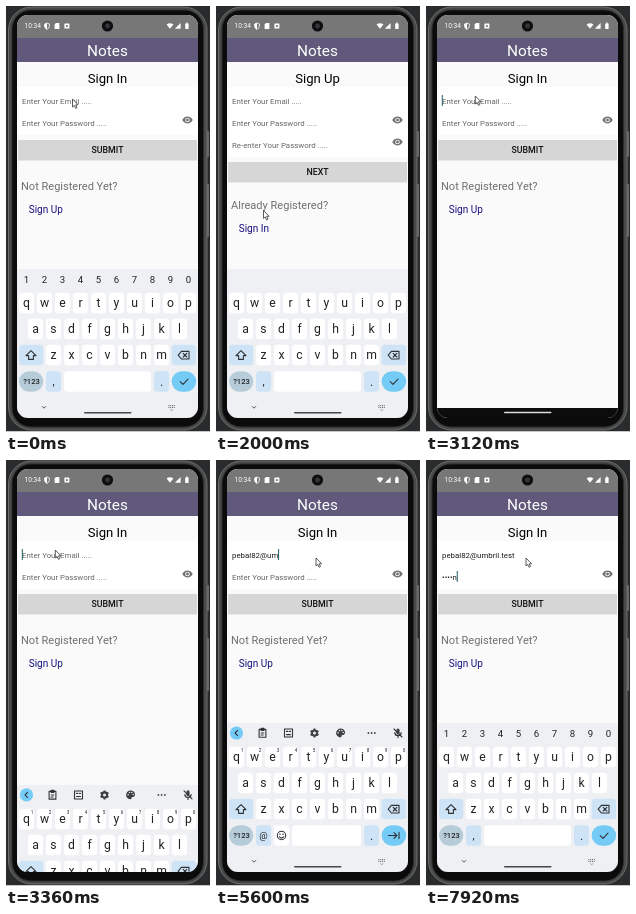
Animation of 204 by 426 pixels, one loop 8000 ms. Source, as an HTML page:

```html
<!DOCTYPE html>
<html lang="en">
<head>
<meta charset="utf-8">
<title>Notes sign in</title>
<style>
  html, body { margin: 0; width: 100%; height: 100%; overflow: hidden; background: #2a2b2c; }
  svg { display: block; width: 204px; height: 426px; font-family: Roboto, sans-serif; }
  text { white-space: pre; }
  .line { fill: none; stroke: #303336; stroke-width: 1.1; stroke-linecap: round; stroke-linejoin: round; }
</style>
</head>
<body>
<svg id="stage" viewBox="0 0 204 426" xmlns="http://www.w3.org/2000/svg"></svg>
<script>
const LOOP = 8000;
const HINT = '#666', INK = '#202124', KEY = '#fff', BLUE = '#cfe3f6', SKY = '#74cbf6';

const rect = (x, y, w, h, fill, r = 0, more = '') =>
  `<rect x="${x}" y="${y}" width="${w}" height="${h}" rx="${r}" fill="${fill}" ${more}/>`;
const text = (x, y, size, fill, str, more = '') =>
  `<text x="${x}" y="${y}" font-size="${size}" fill="${fill}" ${more}>${str}</text>`;
const mid = (x, y, size, fill, str, more = '') =>
  text(x, y, size, fill, str, 'text-anchor="middle" ' + more);
const circle = (x, y, r, fill) => `<circle cx="${x}" cy="${y}" r="${r}" fill="${fill}"/>`;
const path = (d, more = 'class="line"') => `<path d="${d}" ${more}/>`;
const at = (x, y, body) => `<g transform="translate(${x} ${y})">${body}</g>`;
const group = (id, body) => `<g id="${id}">${body}</g>`;

const eye = y => at(181.5, y,
  path('M-5.2 0C-3-4.6 3-4.6 5.2 0C3 4.6-3 4.6-5.2 0Z', 'fill="#707070"') +
  circle(0, 0, 2.3, '#fff') + circle(0, 0, 1.4, '#707070'));

function form(title, button, y, question, questionY, link) {
  return mid(101.5, 77, 13.1, '#000', title) +
    rect(12, y, 179, 20.5, '#d6d6d6') +
    mid(101.5, y + 13.3, 8.8, '#111', button, 'font-weight="500"') +
    text(15, questionY, 11.04, '#707070', question) +
    text(22.7, questionY + 23, 10, '#15107c', link);
}

function key(x, y, w, label, fill = KEY) {
  return rect(x - w / 2, y - 10.3, w, 20.6, fill, 3.5) + mid(x, y + 4, 12.2, INK, label);
}

function row(letters, x, y) {
  return [...letters].map((c, i) => key(x + i * 18, y, 15.2, c)).join('');
}

function digits(x, y, size) {
  return [...'1234567890'].map((c, i) => mid(x + i * 18, y, size, INK, c)).join('');
}

function toolbar() {
  return circle(20.5, 273, 6.6, SKY) + path('M21.6 270.4L19 273L21.6 275.6') +
    at(46.5, 273, path('M-3.4-3.6H3.4V4.2H-3.4ZM-1.4-4.6H1.4V-2.6H-1.4ZM-1.4 0H1.4M-1.4 2H.6')) +
    at(72.5, 273, path('M-4-4H4V4H-4ZM-2-1.6H-.6M1-1.6H2M-2 1.6H2')) +
    at(98.5, 273, circle(0, 0, 3.6, '#3c4043') +
      path('M0-4.5V4.5M-3.9-2.2L3.9 2.2M-3.9 2.2L3.9-2.2', 'stroke="#3c4043" stroke-width="2"') +
      circle(0, 0, 1.5, '#eff0f3')) +
    at(124.5, 273, path('M0-4.4A4.4 4.4 0 1 0 0 4.4C1.5 4.4.4 2.6 1.6 2H3C6 1 4.6-4.4 0-4.4Z', 'fill="#3c4043"') +
      [[-2.4, -.2], [-1, -2.4], [1.4, -2.4], [2.7, -.4]].map(p => circle(...p, .75, '#eff0f3')).join('')) +
    [152.4, 155.6, 158.8].map(x => circle(x, 273, .9, '#3c4043')).join('') +
    at(182, 273, rect(-1.6, -4.6, 3.2, 6, '#3c4043', 1.6) +
      path('M-3.2-.4C-3 3.6 3 3.6 3.2-.4M0 2.8V4.6M-4-4L4 4'));
}

function keyboard() {
  const smile = at(65.5, 375.5, path('M-4.2 0A4.2 4.2 0 1 1 4.2 0A4.2 4.2 0 1 1-4.2 0M-2 1.2C-1.2 2.8 1.2 2.8 2 1.2') +
    circle(-1.5, -1.2, .7, INK) + circle(1.5, -1.2, .7, INK));
  return rect(11, 263, 181, 151, '#eff0f3') +
    row('qwertyuiop', 20.5, 297) + row('asdfghjkl', 29.5, 323) + row('zxcvbnm', 47.5, 349) +
    rect(13, 338.7, 24.3, 20.6, BLUE, 3.5) +
    path('M25 344.6L30 349.6H27.4V353.4H22.6V349.6H20Z') +
    rect(165.6, 338.7, 24.6, 20.6, BLUE, 3.5) +
    path('M175.4 345.4H183V353H175.4L172.2 349.2ZM177.2 347.4L180.8 351M180.8 347.4L177.2 351') +
    rect(13, 365.2, 24.3, 20.6, '#b6cdd9', 10.3) + mid(25.5, 378.2, 7.6, INK, '?123', 'font-weight="500"') +
    rect(40, 365.2, 15.2, 20.6, BLUE, 3.5) +
    key(155.5, 375.5, 15.2, '.', BLUE) +
    rect(165.6, 365.2, 24.6, 20.6, SKY, 10.3) +
    group('digitRow', digits(20.5, 277, 9.6)) +
    group('passKeys', mid(47.5, 379, 11, INK, ',') + rect(58, 365.2, 87, 20.6, KEY, 3.5) +
      path('M174.2 375.7L177 378.4L182 373.2')) +
    group('mailKeys', digits(26, 292, 4.6) + mid(47.5, 378.8, 9.4, INK, '@') +
      rect(58, 365.2, 15.2, 20.6, KEY, 3.5) + smile + rect(76, 365.2, 69, 20.6, KEY, 3.5) +
      path('M172.4 375.5H180.6M178 372.6L180.8 375.5L178 378.4M183 372.4V378.6')) +
    group('tools', toolbar()) +
    path('M36 400.2L38 402.2L40 400.2', 'fill="none" stroke="#444" stroke-width=".9"') +
    path('M162.4 399.6H169M162.4 401.4H169', 'stroke="#555" stroke-width=".9" stroke-dasharray="1 .8"') +
    path('M164.2 403.4L165.7 404.6L167.2 403.4', 'fill="none" stroke="#777" stroke-width=".7"') +
    rect(78, 406.1, 47.5, 1.4, '#45474a', .7);
}

function statusBar() {
  return rect(11, 9, 181, 23, '#777') + text(18.6, 22.4, 6.6, '#fff', '10:34') +
    path('M38.6 18L41 17L43.4 18V20.4Q43 22.4 41 23.4Q39 22.4 38.6 20.4Z',
      'fill="none" stroke="#fff" stroke-width=".8"') + path('M41 17V23.4Q39 22.4 38.6 20.4V18Z', 'fill="#fff"') +
    path('M50 17H53.4V23H48.6V18.4Z', 'fill="#fff"') +
    rect(58.4, 17.6, 5, 5, '#fff', .6) + rect(60, 19.2, 1.8, 1.8, '#777') +
    path('M160.6 18.5Q164 15.8 167.4 18.5L164 22.8Z', 'fill="#fff"') +
    path('M174.6 17V22.8H168.9Z', 'fill="#fff"') +
    rect(179.2, 17.4, 3.4, 5.6, '#fff', .5) + rect(180, 16.6, 1.8, 1, '#fff') +
    circle(101.5, 20, 5.6, '#0e0e0e') + circle(101.5, 20, 2.4, '#33363a');
}

function phone() {
  return rect(0, 0, 204, 426, '#2a2b2c') + rect(0, 425, 204, 1, '#c8c8c8') +
    rect(200.5, 125, 2.5, 26, '#686868', 1) + rect(200.5, 178, 2.5, 53, '#686868', 1) +
    rect(2.5, 1, 198.5, 423, '#484949', 23, 'stroke="#6c6d6d" stroke-width="1"') +
    rect(6, 4, 191.5, 417, '#0b0b0c', 19, 'stroke="#2c2d2d" stroke-width="1"');
}

document.getElementById('stage').innerHTML =
  '<defs><clipPath id="screen"><rect x="11" y="9" width="181" height="403" rx="11"/></clipPath></defs>' +
  phone() + '<g clip-path="url(#screen)">' +
  rect(11, 9, 181, 403, '#fafafa') + rect(11, 81, 181, 48, '#fff', 0, 'id="fields"') +
  statusBar() + rect(11, 32, 181, 24, '#60597b') + mid(101.5, 50, 15.4, '#fff', 'Notes') +
  text(16, 97.8, 7.86, HINT, '', 'id="mail"') + text(16, 119.8, 7.86, HINT, '', 'id="pass"') + eye(114) +
  group('signIn', form('Sign In', 'SUBMIT', 134, 'Not Registered Yet?', 184, 'Sign Up')) +
  group('signUp', text(16, 141.8, 7.86, HINT, 'Re-enter Your Password .....') + eye(136) +
    form('Sign Up', 'NEXT', 156, 'Already Registered?', 203, 'Sign In')) +
  rect(15.8, 89, 1, 11, '#1f6068', 0, 'id="caret"') +
  rect(11, 402, 181, 10, '#0c0c0d') + rect(78, 405.8, 47.5, 1.5, '#dcdcdc', .7) +
  group('keyboard', keyboard()) + '</g>' +
  group('pointer', path('M0 0V8L1.8 6.4L3.1 9.3L4.5 8.6L3.2 5.8H5.6Z',
    'fill="#fff" stroke="#333" stroke-width=".8" stroke-linejoin="round"'));

const el = {};
document.querySelectorAll('svg [id]').forEach(n => el[n.id] = n);

// [time, value]: each value holds until the next time
const MAIL = 'pebal82@umbril.test';
const mailTyped = [[0, 0], [4160, 1], [4320, 2], [4480, 3], [4640, 4], [4800, 5], [4880, 6], [5040, 7],
  [5200, 8], [5600, 10], [5680, 11], [5840, 12], [6000, 13], [6160, 14], [6320, 15], [6400, 17], [6560, 19]];
const passTyped = [[0, ''], [7200, 'k'], [7600, '•e'], [7760, '••a'], [7920, '••••n']];
const caretField = [[0, ''], [720, 'pass'], [1520, ''], [1840, 'pass'], [2000, ''], [3040, 'mail'],
  [3680, ''], [4160, 'mail'], [6720, 'pass']];
const layout = [[0, 'pass'], [2000, 'blank'], [2800, 'mail'], [6720, 'pass']];
const pointerStops = [[0, 66.5, 93], [1519, 66.5, 93], [1520, 47.5, 204.5], [2080, 47.5, 204.5], [2480, 41.3, 219],
  [2760, 41.3, 219], [3040, 49.3, 90], [3999, 49.3, 90], [4000, 100, 98], [LOOP, 100, 98]];

const held = (steps, t) => steps.findLast(s => s[0] <= t)[1];
const ramp = (t, a, b) => Math.min(1, Math.max(0, (t - a) / (b - a)));
const ease = p => p * p * (3 - 2 * p);
const show = (node, on) => node.style.display = on ? '' : 'none';

function setField(node, value, hint) {
  node.textContent = value || hint;
  node.setAttribute('fill', value ? '#1c1c1c' : HINT);
}

function movePointer(t) {
  const i = pointerStops.findIndex(s => s[0] > t);
  const [t0, x0, y0] = pointerStops[i - 1], [t1, x1, y1] = pointerStops[i];
  const p = ease(ramp(t, t0, t1));
  el.pointer.setAttribute('transform', `translate(${x0 + (x1 - x0) * p} ${y0 + (y1 - y0) * p})`);
}

function draw(t) {
  const signUp = t >= 2000 && t < 2800;
  show(el.signIn, !signUp);
  show(el.signUp, signUp);
  el.fields.setAttribute('height', signUp ? 70 : 48);

  const value = { mail: MAIL.slice(0, held(mailTyped, t)), pass: held(passTyped, t) };
  setField(el.mail, value.mail, 'Enter Your Email .....');
  setField(el.pass, value.pass, 'Enter Your Password .....');

  const field = held(caretField, t);
  show(el.caret, field);
  if (field) {
    el.caret.setAttribute('x', 15.8 + (value[field] ? el[field].getComputedTextLength() : 0));
    el.caret.setAttribute('y', field === 'mail' ? 89 : 111);
  }

  const keys = held(layout, t);
  show(el.digitRow, keys === 'pass');
  show(el.passKeys, keys !== 'mail');
  show(el.mailKeys, keys === 'mail');
  show(el.tools, keys === 'mail');

  const hidden = t < 2800 ? ease(ramp(t, 2040, 2400)) : 1 - ease(ramp(t, 3160, 3520));
  show(el.keyboard, hidden < 1);
  el.keyboard.setAttribute('transform', `translate(0 ${150 * hidden})`);
  movePointer(t);
}

const start = performance.now();
function tick() {
  draw((performance.now() - start) % LOOP);
  requestAnimationFrame(tick);
}
tick();
</script>
</body>
</html>
```
